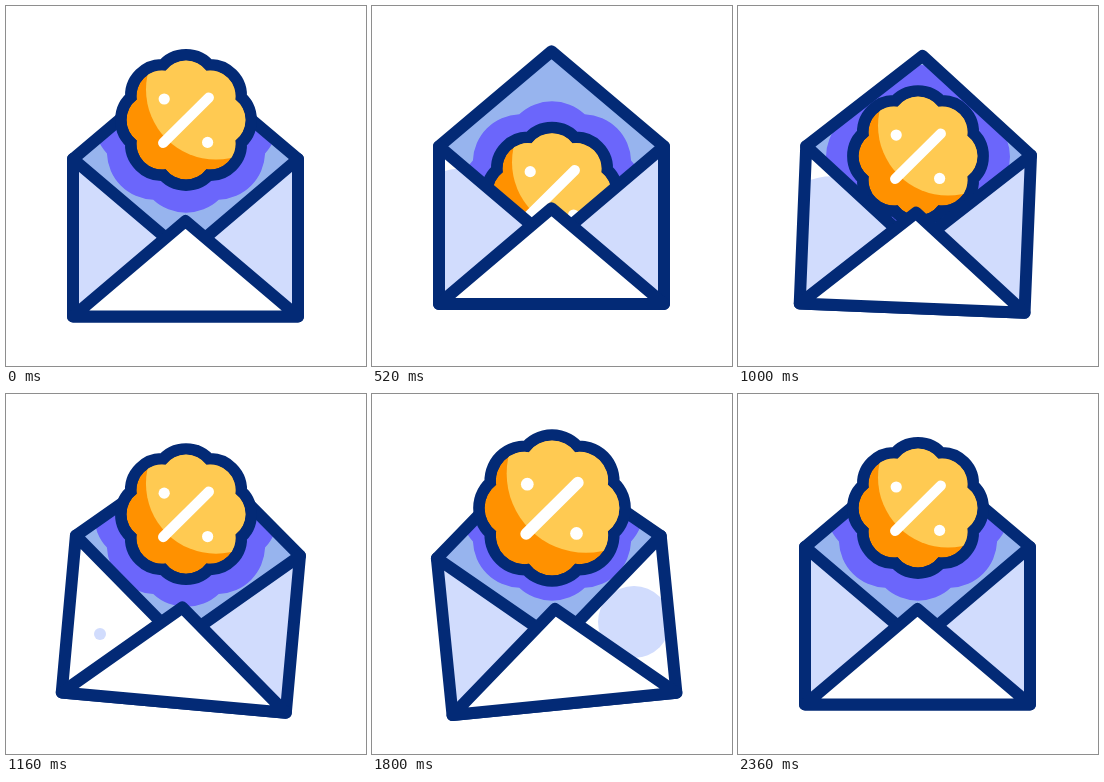
Write an HTML page that moves like this. It is 360 px wide and 360 px high and loops after 2.4 s.

```html
<!DOCTYPE html>
<html lang="en">
<head>
<meta charset="utf-8">
<title>Discount letter</title>
<style>
html, body { margin: 0; width: 100%; height: 100%; overflow: hidden; background: #fff; }
svg { display: block; width: 100%; height: 100%; }
.line { fill: none; stroke: #032a76; stroke-width: 12; stroke-linejoin: round; stroke-linecap: round; }
</style>
</head>
<body>
<svg viewBox="0 0 360 360">
  <defs>
    <clipPath id="inside"><path class="env" d="M67 153L179.5 58L292 153L179.5 248.5Z"/></clipPath>
    <clipPath id="sides"><path class="env" d="M67 153L179.5 248.5L292 153V310.5H67Z"/></clipPath>
    <clipPath id="face"><path class="scallop"/></clipPath>
  </defs>

  <path class="env" fill="#97b4ee" d="M67 153L179.5 58L292 153L179.5 248.5Z"/>
  <g clip-path="url(#inside)">
    <path id="shadow" fill="#6b66fb"/>
  </g>
  <path class="env line" d="M67 153L179.5 58L292 153"/>

  <g id="badge">
    <path id="rim" class="scallop line"/>
    <g clip-path="url(#face)">
      <path class="scallop" fill="#ff9100"/>
      <circle cx="30" cy="-30.5" r="70" fill="#ffca52"/>
    </g>
    <path d="M-22.8 22.8L22.8 -22.4" stroke="#fff" stroke-width="10.3" stroke-linecap="round"/>
    <circle cx="-21.8" cy="-21" r="5.6" fill="#fff"/>
    <circle cx="21.6" cy="22.4" r="5.6" fill="#fff"/>
  </g>

  <path class="env" fill="#fff" d="M67 153L179.5 248.5L292 153V310.5H67Z"/>
  <g clip-path="url(#sides)" fill="#d1dcfd">
    <circle id="left" cx="94" cy="240"/>
    <circle id="right" cx="262" cy="228"/>
  </g>
  <g class="env">
    <path class="line" d="M160 232L67 153V310.5H292V153L199 232"/>
    <path class="line" style="fill:#fff" d="M67 310.5L179.5 215L292 310.5Z"/>
  </g>
</svg>
<script>
const LOOP = 2400, STEP = 40, TILT = 5.7, LIFT = -14, RIM = 11.4;
const $ = id => document.getElementById(id);
const each = (sel, fn) => document.querySelectorAll(sel).forEach(fn);

// Eight equal arcs whose centres lie on a ring
function scallop(ring, r) {
  const half = Math.PI / 8;
  const notch = ring * Math.cos(half) + Math.sqrt(r * r - (ring * Math.sin(half)) ** 2);
  let d = "";
  for (let i = 0; i <= 8; i++) {
    const a = (2 * i - 1) * half;
    const p = (notch * Math.cos(a)).toFixed(2) + " " + (notch * Math.sin(a)).toFixed(2);
    d += i ? `A${r} ${r} 0 0 1 ${p}` : "M" + p;
  }
  return d + "Z";
}

// Value between [time, value] keys, eased by half a cosine wave
function track(t, keys) {
  let [t0, v0] = keys[0];
  for (const [t1, v1] of keys) {
    if (t < t1) {
      const p = Math.max(0, (t - t0) / (t1 - t0 || 1));
      return t < t0 ? v0 : v0 + (v1 - v0) * (1 - Math.cos(Math.PI * p)) / 2;
    }
    [t0, v0] = [t1, v1];
  }
  return v0;
}

const badgeY = [[60, 114], [680, 200], [1260, 114]];
const badgeSize = [[1130, 1], [1680, 1.145], [2340, 1]];
const envY = [[60, 0], [640, LIFT], [800, LIFT], [1250, 0]];
const envTilt = [[800, 0], [1250, TILT], [1400, TILT], [1740, -TILT], [1860, -TILT], [2350, 0]];
// The side panels' tint shrinks and spreads again
const tint = {
  left: [[80, 100], [320, 29], [640, 100], [900, 100], [1160, 6], [1400, 26], [1700, 100]],
  right: [[80, 100], [320, 36], [640, 100], [1480, 100], [1800, 36], [2200, 100]]
};

function draw(t) {
  const y = track(t, badgeY), size = track(t, badgeSize);
  const move = `translate(0 ${track(t, envY)}) rotate(${track(t, envTilt)} 180 180)`;
  each(".env", el => el.setAttribute("transform", move));
  $("shadow").setAttribute("transform", `translate(180 ${y + 0.7})`);
  $("badge").setAttribute("transform", `translate(180 ${y}) scale(${size})`);
  $("rim").style.strokeWidth = 2 * RIM / size;
  for (const side in tint) $(side).setAttribute("r", track(t, tint[side]));
}

function frame(now) {
  draw(Math.floor((now % LOOP) / STEP) * STEP);
  requestAnimationFrame(frame);
}

each(".scallop", el => el.setAttribute("d", scallop(34, 25.5)));
$("shadow").setAttribute("d", scallop(44, 48));
frame(performance.now());
</script>
</body>
</html>
```
